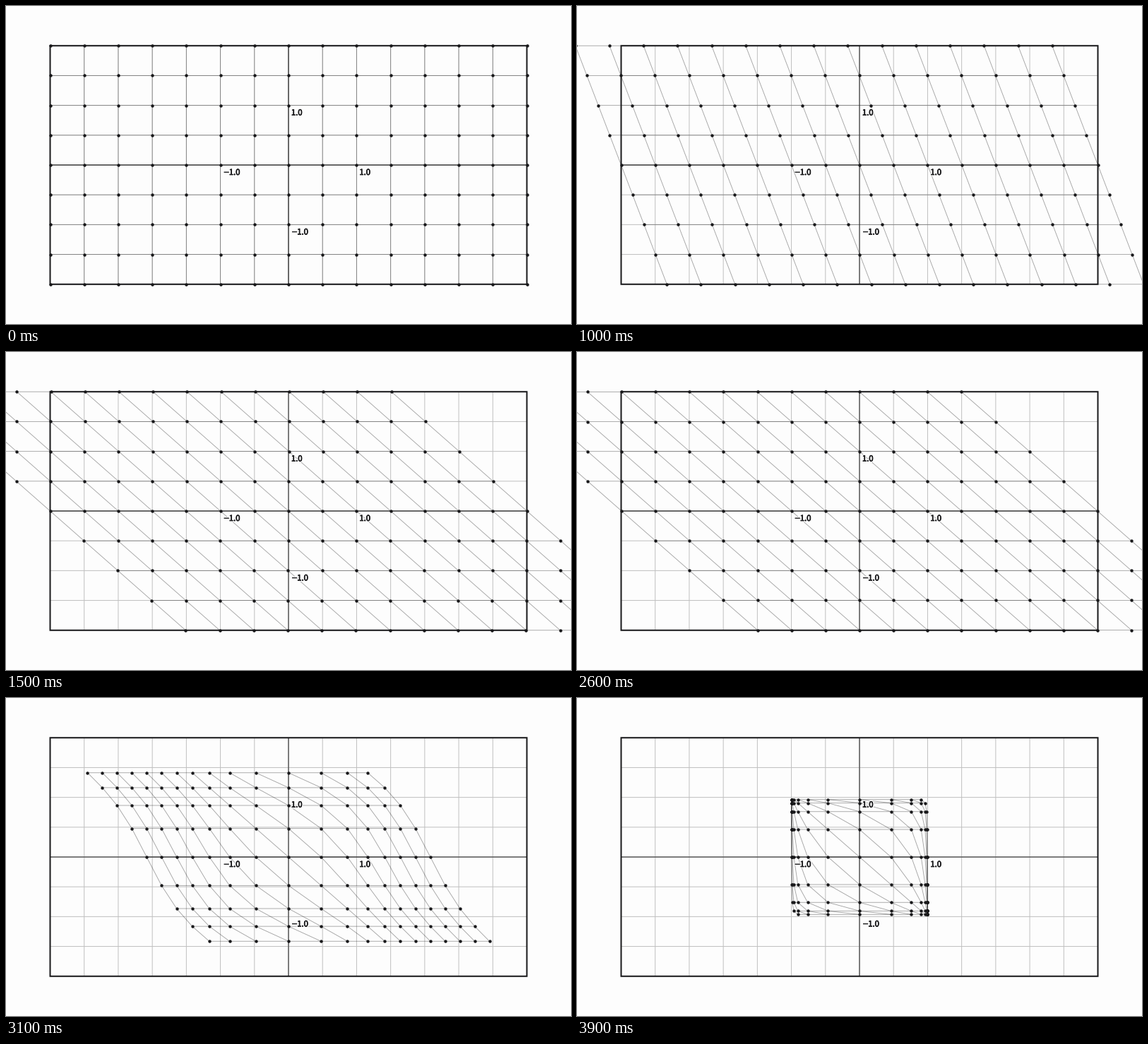
These frames come from a looping animation (800x450 px, 4.3 s). A matplotlib script:

```python
import math

import matplotlib.pyplot as plt
import numpy as np
from matplotlib.animation import FuncAnimation
from matplotlib.collections import LineCollection
from matplotlib.patches import Rectangle
from matplotlib.patheffects import Normal, Stroke

W, H, DPI = 800, 450, 100
PX = 72 / DPI                      # points per pixel
CX, CY = 400, 225
UX, UY = 675 / 7, 337.5 / 4        # pixels per unit
FRAMES, STEP = 86, 50
SPREAD = 168.5                     # width of the ease, ms
INK = "#18181a"

XS = np.linspace(-3.5, 3.5, 15)
YS = np.linspace(-2, 2, 9)
GX, GY = np.meshgrid(XS, YS)


def to_px(x, y):
    return CX + UX * np.asarray(x), CY - UY * np.asarray(y)


def ease(t, start, mid):
    if t < start:
        return 0.0
    return 0.5 * (1 + math.erf((t - mid) / (SPREAD * math.sqrt(2))))


def mesh(t):
    """Shear the lattice, then squash it with tanh."""
    shear = ease(t, 600, 1071.5)
    squash = ease(t, 2500, 3071.8)
    x, y = GX - shear * GY, GY
    x = x + squash * (np.tanh(x) - x)
    y = y + squash * (np.tanh(y) - y)
    return np.stack(to_px(x, y), axis=-1)


fig = plt.figure(figsize=(W / DPI, H / DPI), dpi=DPI, facecolor="#fdfdfd")
ax = fig.add_axes([0, 0, 1, 1])
ax.set_xlim(0, W)
ax.set_ylim(H, 0)
ax.axis("off")

left, top = to_px(-3.5, 2)
right, bottom = to_px(3.5, -2)


def rule(x, y, color, width, z):
    ax.plot(x, y, color=color, lw=width * PX, snap=False, zorder=z,
            solid_capstyle="butt")


# Fixed grid, axes and frame
for x in to_px(XS, 0)[0]:
    rule([x, x], [top, bottom], "#c0c0c0", 1, 1)
for y in to_px(0, YS)[1]:
    rule([left, right], [y, y], "#c0c0c0", 1, 1)
rule([CX, CX], [top, bottom], "#484848", 1.3, 2)
rule([left, right], [CY, CY], "#484848", 1.3, 2)
ax.add_patch(Rectangle((left, top), right - left, bottom - top, fill=False,
                       ec=INK, lw=2 * PX, snap=False, zorder=4))


def label(x, y, negative=False):
    px, py = to_px(x, y)
    base = py + 14
    start = px + (12.2 if negative else 3.9)
    halo = Stroke(linewidth=3 * PX, foreground="#fdfdfd")
    bold = Stroke(linewidth=0.7 * PX, foreground=INK)
    if negative:
        bar = [px + 5, px + 12.2], [base - 3.8] * 2
        rule(*bar, "#fdfdfd", 4, 6)
        rule(*bar, INK, 1.4, 8)
    ax.text(start, base, "1.0", family="Noto Sans CJK JP",
            fontsize=11.3 * PX, color=INK, ha="left", va="baseline",
            zorder=7, path_effects=[halo, bold, Normal()])


label(1, 0)
label(0, 1)
label(-1, 0, negative=True)
label(0, -1, negative=True)

# Moving lattice
lines = LineCollection([], colors=[(0, 0, 0, 0.35)], linewidths=0.9 * PX,
                       zorder=3, snap=False)
ax.add_collection(lines, autolim=False)
dots, = ax.plot([], [], "o", ms=4.4 * PX, mfc=INK, mec="none", snap=False,
                zorder=5)


def draw(k):
    pts = mesh(k * STEP)
    lines.set_segments(list(pts) + list(pts.swapaxes(0, 1)))
    dots.set_data(pts[..., 0].ravel(), pts[..., 1].ravel())
    return lines, dots


anim = FuncAnimation(fig, draw, frames=FRAMES, interval=STEP, repeat=True,
                     repeat_delay=0, blit=False)
plt.show()
```
